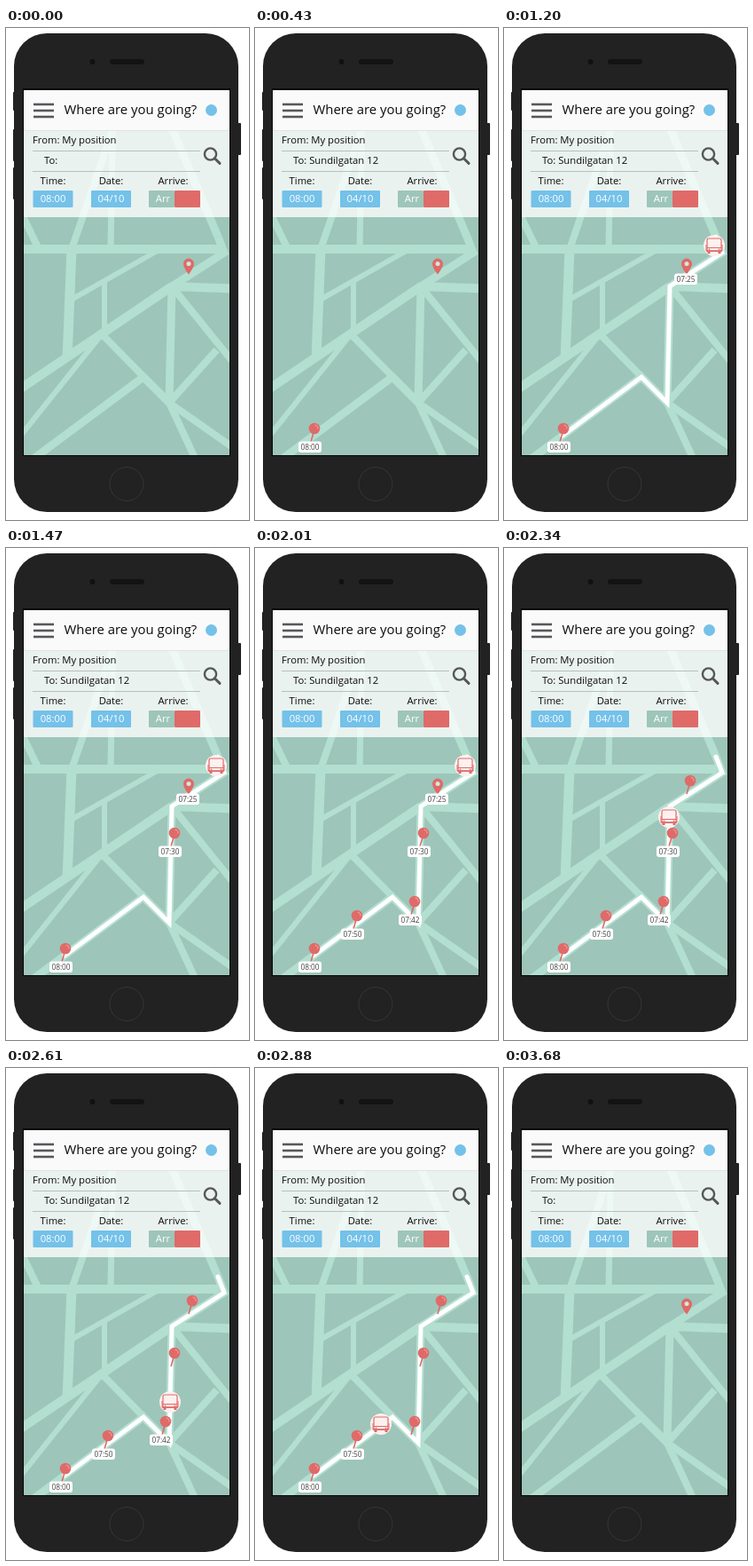
An HTML page with a canvas for the animation above (4.28 s loop, 274 by 554 pixels).

```html
<!DOCTYPE html>
<html lang="en">
<head>
<meta charset="utf-8">
<title>Route search</title>
<style>
html, body { margin: 0; width: 100%; height: 100%; overflow: hidden; background: #fff; }
canvas { display: block; width: 274px; height: 554px; }
</style>
</head>
<body>
<canvas id="stage"></canvas>
<script>
const W = 274, H = 554, LOOP = 4280;
const canvas = document.getElementById('stage');
const ratio = window.devicePixelRatio || 1;
canvas.width = W * ratio;
canvas.height = H * ratio;
const ctx = canvas.getContext('2d');
ctx.scale(ratio, ratio);

const RED = '#df6a68', BLUE = '#74c1e9', LAND = '#9ec5b9', ROAD = '#b3dfd0';
const INK = '#0c0c0c', GREY = '#57575a', PALE = '#fdf1f0';

// The steps of the story: address, bus, three more stops, three rides, reset.
const CUES = [430, 1200, 1470, 1740, 2010, 2340, 2610, 2880, 3680];
const ADDRESS = 1, BUS = 2, RIDE = 6, RESET = 9;

// Junctions along the route, from the bus to the destination.
const START = [239, 235], EAST = [246, 253], CROSS = [187, 291];
const SOUTH = [184, 422], BEND = [155, 393], HOME = [66, 459];
const ROUTE = [START, EAST, CROSS, SOUTH, BEND, HOME];
const FORK = [111, 341];

const STOPS = [
  { x: 210, y: 262, label: '07:25' },
  { x: 190, y: 321, label: '07:30' },
  { x: 180, y: 398, label: '07:42' },
  { x: 115, y: 414, label: '07:50' }
];
const GOAL = { x: 67, y: 451, label: '08:00' };
const BUS_AT = [[237, 245], [186, 303], [185, 376], [142, 401]];

function rect(x, y, w, h, color, r = 0) {
  ctx.fillStyle = color;
  ctx.beginPath();
  ctx.roundRect(x, y, w, h, r);
  ctx.fill();
}

function disc(x, y, r, color) {
  ctx.fillStyle = color;
  ctx.beginPath();
  ctx.arc(x, y, r, 0, Math.PI * 2);
  ctx.fill();
}

function arc(x, y, r, width, color, from = 0, to = Math.PI * 2) {
  ctx.strokeStyle = color;
  ctx.lineWidth = width;
  ctx.beginPath();
  ctx.arc(x, y, r, from, to);
  ctx.stroke();
}

function line(points, width, color, cap = 'butt') {
  ctx.strokeStyle = color;
  ctx.lineWidth = width;
  ctx.lineCap = cap;
  ctx.beginPath();
  for (const [x, y] of points) ctx.lineTo(x, y);
  ctx.stroke();
}

function text(str, x, y, color = INK, align = 'left', size = 11.25) {
  ctx.font = size + 'px "Open Sans", "Noto Sans", sans-serif';
  ctx.fillStyle = color;
  ctx.textAlign = align;
  ctx.fillText(str, x, y);
}

// A road leaving a junction at an angle in degrees; long ones run off the map.
function road([x, y], angle, width, length = 400) {
  const a = angle * Math.PI / 180;
  line([[x, y], [x + length * Math.cos(a), y + length * Math.sin(a)]], width, ROAD);
}

function drawPhone() {
  const body = '#222223';
  for (const y of [114, 157]) rect(8, y, 5, 36, body, 1);
  rect(8, 72, 5, 21, body, 1);
  rect(260, 107, 5, 36, body, 1);
  rect(9, 6, 253, 539, body, 37);
  disc(97.5, 38, 3, '#111114');
  rect(117, 35, 39, 6, '#131314', 3);
  arc(136, 513.5, 19, 1, '#363637');
  rect(19, 68, 234, 414, '#050505');
}

function drawMap() {
  rect(20, 70, 232, 411, LAND);
  line(ROUTE, 9, ROAD);
  road(START, -113, 9);
  road([246, 249], 180, 10);
  road(CROSS, 146, 10);
  road(CROSS, 2, 10);
  road(CROSS, 51, 8);
  road(SOUTH, 35, 8);
  road(SOUTH, 65, 8);
  road(SOUTH, -48, 8, 80);
  road(SOUTH, 225.5, 8, 108);
  road(HOME, 143.4, 9);
  road(FORK, -90, 6, 56);
  road(FORK, 128.7, 6);
  road([74, 249], 92.3, 11, 122);
  road([74, 249], -71, 8);
  road([118, 249], -89, 7);
  road([37, 249], -116, 8);
  road([174, 249], 150.5, 6, 119);
}

function drawForm(filled) {
  rect(20, 115, 232, 98, 'rgba(255,255,255,0.78)');
  rect(20, 70, 232, 45, '#fafafa');
  rect(20, 115, 232, 1, '#dfe5e3');
  for (const y of [86, 93, 100]) line([[31, y], [54, y]], 2.6, GREY);
  text('Where are you going?', 65.5, 97, INK, 'left', 14.9);
  disc(231.5, 92.5, 6.5, BLUE);

  text('From: My position', 30, 130);
  text(filled ? 'To: Sundilgatan 12' : 'To:', 43, 153);
  for (const y of [138.5, 161.5]) line([[30, y], [219, y]], 1, '#b9bfbd');
  arc(230.5, 142, 6.6, 2.4, GREY);
  line([[235.3, 146.8], [241, 152.4]], 3, GREY, 'round');

  ['Time:', 'Date:', 'Arrive:'].forEach((title, i) => {
    const x = 30.5 + 65.5 * i;
    text(title, x + 22.5 + (i === 2 ? 4.5 : 0), 176, INK, 'center');
    if (i < 2) {
      rect(x, 183, 45, 19, BLUE, 1);
      text(['08:00', '04/10'][i], x + 22.5, 195.5, '#fff', 'center');
    }
  });
  rect(161, 183, 29, 19, LAND, 1);
  rect(190, 183, 29, 19, RED, 1);
  text('Arr', 177, 195.5, '#fff', 'center');
}

function drawLabel({ x, y, label }) {
  rect(x - 18, y + 14.5, 26, 12.5, '#fff', 3);
  text(label, x - 5, y + 23.7, '#444', 'center', 8.3);
}

function drawBall({ x, y }) {
  line([[x - 0.8, y + 4], [x - 4, y + 15]], 1.6, RED);
  disc(x, y, 6.3, RED);
  arc(x, y, 4, 0.9, '#f3b5b3', -1.4, 0.1);
}

function drawHere() {
  ctx.fillStyle = RED;
  ctx.beginPath();
  ctx.arc(206, 265.5, 6, Math.PI * 0.9, Math.PI * 0.1);
  ctx.quadraticCurveTo(210.5, 271.5, 206, 277.5);
  ctx.quadraticCurveTo(201.5, 271.5, 200.3, 267.4);
  ctx.fill();
  disc(206, 265.5, 2.5, '#d3e6de');
}

function drawBus([x, y]) {
  disc(x, y, 12, PALE);
  ctx.strokeStyle = RED;
  ctx.lineWidth = 1.2;
  ctx.beginPath();
  ctx.roundRect(x - 8, y - 8, 16, 14.5, 2);
  ctx.stroke();
  line([[x - 8, y + 2.5], [x + 8, y + 2.5]], 1, RED);
  line([[x - 9, y + 6], [x + 9, y + 6]], 1.6, RED);
  for (const side of [-1, 1]) {
    line([[x + side * 9, y - 1], [x + side * 9, y + 6]], 1, RED);
    rect(x + side * 6 - 1.5, y + 6, 3, 3, RED, 0.5);
    disc(x + side * 5.5, y + 4.4, 0.8, RED);
  }
}

function drawTrip(step) {
  if (step >= BUS) line(ROUTE, 5, '#fff', 'round');
  if (step < RIDE) drawHere();
  drawBall(GOAL);
  drawLabel(GOAL);
  // Stops appear one per step; each ride then clears one label.
  STOPS.forEach((stop, i) => {
    if (step < BUS + i) return;
    if (i > 0 || step >= RIDE) drawBall(stop);
    if (step < RIDE + i) drawLabel(stop);
  });
  if (step >= BUS) drawBus(BUS_AT[Math.max(0, step - RIDE + 1)]);
}

function draw(t) {
  const step = CUES.filter(cue => t >= cue).length;
  const active = step >= ADDRESS && step < RESET;
  ctx.clearRect(0, 0, W, H);
  drawPhone();
  ctx.save();
  ctx.beginPath();
  ctx.rect(20, 70, 232, 411);
  ctx.clip();
  drawMap();
  drawForm(active);
  if (active) drawTrip(step);
  else drawHere();
  ctx.restore();
}

const start = performance.now();
function tick() {
  draw((performance.now() - start) % LOOP);
  requestAnimationFrame(tick);
}
tick();
</script>
</body>
</html>
```
